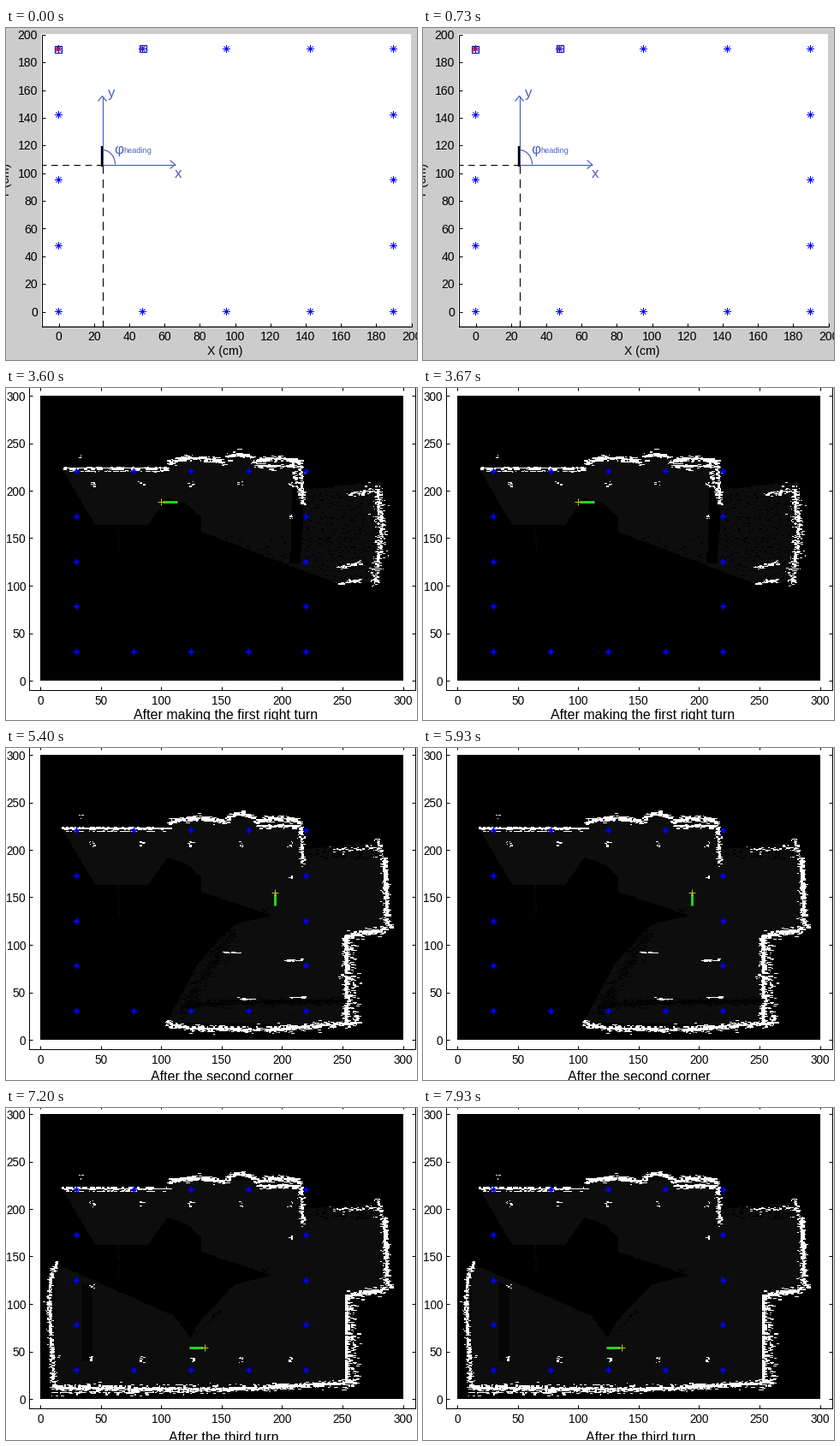
Recreate the animation shown at these times as a matplotlib script. Size 480 by 388 pixels, loop 8000 ms.

```python
import numpy as np
import matplotlib.pyplot as plt
from matplotlib.animation import FuncAnimation
from matplotlib.patches import Rectangle
from matplotlib.path import Path

W, H, DPI = 480, 388, 100
PX = 72 / DPI
FRAMES, INTERVAL = 40, 200

BLUE, INK = "#0000ff", "#4a5fc4"
GREEN, YELLOW = "#1fd51f", "#c8c020"
FLOOR = 13

plt.rcParams["font.family"] = "Liberation Sans"
fig = plt.figure(figsize=(W / DPI, H / DPI), dpi=DPI)
ax = fig.add_axes([0, 0, 1, 1])
ax.axis("off")

scenes = []


def keep(artist):
    scenes[-1].append(artist)
    return artist


def line(xs, ys, color="black", w=1.0, z=3, **kw):
    return keep(ax.plot(xs, ys, color=color, lw=w * PX, zorder=z,
                        solid_capstyle="butt", **kw)[0])


def rect(x0, y0, x1, y1, color, z=1):
    keep(ax.add_patch(Rectangle((x0 - .5, y0 - .5), x1 - x0, y1 - y0,
                                color=color, lw=0, zorder=z)))


def label(x, y, s, size=14, color="black", ha="center"):
    # y is the middle of the digit height
    keep(ax.text(x, y + 0.36 * size, s, fontsize=size * PX, color=color,
                 ha=ha, va="baseline", zorder=6))


def star(x, y, r=4.5, color=BLUE, w=1.0, diag=0.67):
    x, y, d = round(x), round(y), r * diag
    for dx, dy in ((r, 0), (0, r), (d, d), (d, -d)):
        line([x - dx, x + dx], [y - dy, y + dy], color, w, z=4, snap=False)


def landmarks(px, py, lo, hi, **kw):
    steps = np.linspace(lo, hi, 5)
    for a in steps:
        for b in steps:
            if a in (lo, hi) or b in (lo, hi):
                star(px(a), py(b), **kw)


# ---- coordinate sketch -------------------------------------------------

def arrow(x, y, dx, dy, size):
    tx, ty = x + size * dx, y + size * dy
    line([x, tx], [y, ty], INK, 1.2)
    line([tx - 6 * dx - 5 * dy, tx, tx - 6 * dx + 5 * dy],
         [ty - 6 * dy - 5 * dx, ty, ty - 6 * dy + 5 * dx], INK, 1.2)


def sketch():
    scenes.append([])

    def px(v):
        return 61 + 2.06 * v

    def py(v):
        return 331 - 1.617 * v

    rect(0, 0, W, H, "#cccccc", 0)
    rect(41, 7, 473, 348, "white")
    line([41, 41, 473], [7, 348, 348])
    for v in range(0, 201, 20):
        line([px(v)] * 2, [348, 344])
        line([41, 45], [py(v)] * 2)
        label(px(v), 359, str(v))
        label(36.5, py(v), str(v), ha="right")
    label(255, 376, "X (cm)")
    keep(ax.text(7, 178, "Y (cm)", fontsize=14 * PX, rotation=90,
                 ha="right", va="center", zorder=6))
    landmarks(px, py, 0, 190)

    for x, y, r, color in ((60, 24, 2.6, "#d01030"), (159, 23, 1.6, "#802050")):
        keep(ax.add_patch(Rectangle((x - 4, y - 4), 8, 8, fill=False,
                                    ec="#1515c8", lw=1.2 * PX, zorder=5)))
        star(x, y, r, color, 1.4)

    x, y = 112, 159
    line([x, 41], [y, y], w=1.1, dashes=(7, 5))
    line([x, x], [y, 348], w=1.1, dashes=(9, 6))
    arrow(x, y, 0, -1, 80)
    arrow(x, y, 1, 0, 85)
    a = np.linspace(0, np.pi / 2, 20)
    line(x + 15 * np.cos(a), y - 17 * np.sin(a), INK, 1.2)
    line([x - .7] * 2, [137, 161], w=2.4, z=5)
    label(122, 74, "y", 17, INK)
    label(201, 168, "x", 17, INK)
    label(131, 140.5, "φ", 17, INK)
    label(136.5, 142.5, "heading", 9.2, INK, ha="left")


# ---- occupancy maps ----------------------------------------------------

class Grid:
    """300 x 300 cells, addressed in stage pixels."""
    N, LEFT, WIDTH, HEIGHT = 300, 39.5, 424, 333

    def __init__(self, top):
        self.top = top
        self.rng = np.random.default_rng(4)
        self.cells = np.zeros((self.N, self.N))
        c, r = np.meshgrid(np.arange(self.N), np.arange(self.N))
        self.centres = np.column_stack(
            [self.LEFT + (c.ravel() + .5) * self.WIDTH / self.N,
             top + (r.ravel() + .5) * self.HEIGHT / self.N])

    def fill(self, pts, value=FLOOR):
        hit = Path(pts).contains_points(self.centres)
        self.cells[hit.reshape(self.N, self.N)] = value

    def dab(self, xs, ys, value, run):
        cols = ((xs - self.LEFT) * self.N / self.WIDTH).astype(int)
        rows = ((ys - self.top) * self.N / self.HEIGHT).astype(int)
        sizes = self.rng.integers(1, run + 1, len(cols))
        for c, r, k in zip(cols, rows, sizes):
            if 0 <= r < self.N and c >= 0:
                self.cells[r, c:c + k] = value

    def wall(self, pts, w=4, density=3.0, run=3, value=255):
        """Dense stroke whose scatter thins out sideways."""
        for (x0, y0), (x1, y1) in zip(pts[:-1], pts[1:]):
            n = int(np.hypot(x1 - x0, y1 - y0) * density)
            t = self.rng.random(n)
            jx, jy = self.rng.laplace(0, w / 4, (2, n))
            self.dab(x0 + t * (x1 - x0) + jx, y0 + t * (y1 - y0) + jy,
                     value, run)

    def dust(self, x0, y0, x1, y1, n, value=255, run=2):
        self.dab(self.rng.uniform(x0, x1, n), self.rng.uniform(y0, y1, n),
                 value, run)

    def pillars(self, y, xs):
        for x in xs:
            self.dust(x - 3, y - 3, x + 3, y + 3, 7)


PILLARS = np.linspace(100, 332, 5)
TOP_EDGE = [(66, 96), (190, 96), (200, 85), (343, 82), (349, 118), (440, 110)]
NOTCH = [(228, 168), (228, 152), (212, 136), (188, 128), (165, 160), (104, 160)]


def top_wall(g):
    g.wall([(66, 94), (190, 94)], 1.2, 3)
    g.wall([(70, 97), (188, 97)], 1, .4)
    for x0, x1 in ((189, 254), (257, 286), (288, 343)):
        t = np.linspace(0, 1, 6)
        y = 87 - 5 * np.sin(np.pi * t) - 5 * (x0 == 257)
        g.wall(list(zip(x0 + (x1 - x0) * t, y)), 4, 3, 4)
    g.wall([(292, 91), (341, 92)], 3, 2, 4)
    g.wall([(343, 86), (346, 135)], 3, 3, 2)
    g.pillars(112, PILLARS)
    g.pillars(150, PILLARS[-1:])
    g.wall([(131, 161), (132, 195)], 1, 1, 1, 9)
    g.dust(84, 78, 88, 83, 4)


def start_map():
    g = Grid(9.5)
    g.fill([(66, 97), (215, 91), (199, 114), *NOTCH[-2:]])
    g.fill([(104, 107), (206, 107), (199, 115), (97, 115)], 0)
    g.wall([(66, 96), (93, 96)], 3, 3)
    g.wall([(94, 96), (192, 97)], 1, 5)
    g.wall([(195, 88), (213, 91)], 2, 4)
    g.pillars(113, PILLARS[:1])
    return g


def first_turn_map():
    g = Grid(9)
    g.fill([*TOP_EDGE, (438, 226), (388, 229), *NOTCH])
    g.fill([(334, 98), (340, 98), (347, 146), (343, 205), (331, 205)], 0)
    g.dust(345, 112, 436, 226, 600, 0)
    g.dust(240, 172, 330, 207, 90, 0)
    top_wall(g)
    g.wall([(334, 88), (343, 130)], 3, 1.2, 2)
    g.wall([(400, 124), (436, 120)], 6, 1.8, 2)
    g.wall([(433, 118), (438, 170), (430, 228)], 8, 3.5, 2)
    for y in (210, 229):
        g.wall([(387, y), (413, y - 5)], 3, 1.5)
    return g


def east_rooms(g):
    g.fill([*TOP_EDGE, (445, 210), (396, 218), (396, 324), (187, 321),
            (225, 250), (267, 206), (310, 196), *NOTCH])
    g.dust(350, 92, 436, 130, 350, 0, 3)
    g.wall([(260, 182), (310, 195)], 5, 1, 2, 0)
    top_wall(g)
    g.wall([(380, 119), (436, 117)], 8, .8)
    g.wall([(434, 107), (438, 130)], 7, 2.4, 2)
    g.wall([(441, 128), (444, 206), (450, 209)], 4, 4)
    g.wall([(444, 212), (396, 220), (397, 320)], 5, 4.5)
    g.wall([(403, 225), (406, 320)], 7, 1)


def second_corner_map():
    g = Grid(8)
    east_rooms(g)
    g.wall([(262, 214), (203, 312)], 14, 4, 3, 4)
    g.wall([(205, 304), (236, 298), (394, 296)], 6, 4, 4, 3)
    g.wall([(187, 321), (206, 327), (300, 330), (412, 321)], 5, 3.6)
    for x, y in ((280, 294), (340, 292), (262, 239), (336, 248)):
        g.wall([(x - 9, y), (x + 9, y)], 2, 1.4)
    return g


def third_turn_map():
    g = Grid(7)
    east_rooms(g)
    g.fill([(57, 182), (196, 243), (216, 270), (267, 206), (396, 218),
            (396, 324), (55, 332)])
    g.fill([(87, 203), (100, 208), (101, 294), (88, 296)], 5)
    g.wall([(218, 268), (250, 237)], 4, .6, 2, 0)
    g.wall([(58, 181), (51, 200), (50, 240), (55, 326)], 4, 3.4, 2)
    g.wall([(55, 327), (255, 329), (408, 321)], 5, 4)
    g.wall([(52, 333), (220, 332)], 4, .7)
    g.pillars(294, PILLARS)
    g.pillars(209, PILLARS[:1])
    return g


def robot(x, y, dx, dy):
    """Cross at the front, body trailing along (dx, dy)."""
    line([x + 2 * dx, x + 18 * dx], [y + 2 * dy, y + 18 * dy], GREEN, 3, z=4)
    line([x - 4, x + 4], [y, y], YELLOW, z=5)
    line([x, x], [y - 4, y + 4], YELLOW, z=5)


def map_scene(g, title, cx, pose):
    scenes.append([])
    top = g.top
    y0 = top + 332.5
    left, right, roof, floor = 26, 477, top - 10.5, y0 + 11

    def px(v):
        return 39.5 + 1.412 * v

    def py(v):
        return y0 - 1.11 * v

    rect(0, 0, W, H, "white", 0)
    keep(ax.imshow(g.cells, cmap="gray", vmin=0, vmax=255, aspect="auto",
                   interpolation="nearest", zorder=2,
                   extent=(g.LEFT, g.LEFT + g.WIDTH, top + g.HEIGHT, top)))
    line([left, right, right, left, left], [roof, roof, floor, floor, roof])
    for v in range(0, 301, 50):
        x, y = px(v), py(v)
        for edge, d in ((floor, -4), (roof, 4)):
            line([x, x], [edge, edge + d])
        for edge, d in ((left, 4), (right, -4)):
            line([edge, edge + d], [y, y])
        label(x, floor + 12.5, str(v), 13.5)
        label(22.5, y + .7, str(v), 13.5, ha="right")
    label(cx, 384 - 1.6 * (top - 7), title, 16)
    landmarks(px, py, 30, 220, r=4, diag=.5, w=1.3)
    robot(*pose)


sketch()
map_scene(start_map(), "Initial position", 252.5, (117, 192, 0, -.85))
map_scene(first_turn_map(), "After making the first right turn", 256,
          (180, 132, 1.1, 0))
map_scene(second_corner_map(), "After the second corner", 251.5,
          (313, 168, 0, .85))
map_scene(third_turn_map(), "After the third turn", 254, (231, 279, -1, 0))

ax.set_xlim(-.5, W - .5)
ax.set_ylim(H - .5, -.5)


def update(i):
    # each scene holds for 1.8 s; the loop ends within the last
    current = i * INTERVAL // 1800
    for k, artists in enumerate(scenes):
        for a in artists:
            a.set_visible(k == current)
    return scenes[current]


anim = FuncAnimation(fig, update, frames=FRAMES, interval=INTERVAL,
                     repeat=True, repeat_delay=0, blit=False)
plt.show()
```
